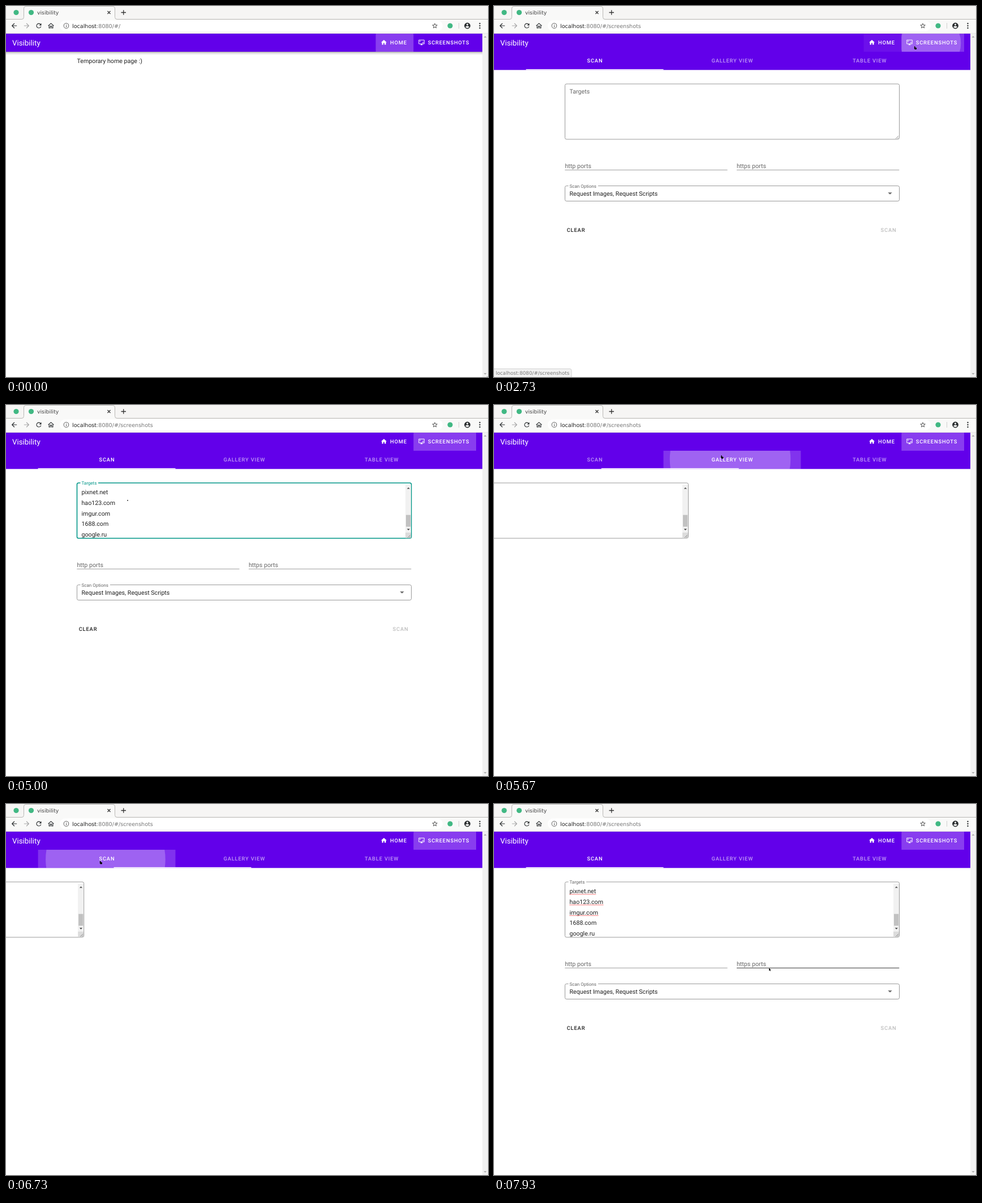
Recreate the animation shown at these times as an HTML page. Size 852 px wide and 657 px high, loop 8000 ms.

```html
<!DOCTYPE html>
<html lang="en">
<head>
<meta charset="utf-8">
<title>Visibility</title>
<style>
html, body { margin: 0; width: 100%; height: 100%; overflow: hidden; background: #fff; }
svg { display: block; width: 852px; height: 657px; font: 10.67px Roboto, sans-serif; text-rendering: geometricPrecision; }
text { white-space: pre; fill: #212121; }
.ui { font-family: "DejaVu Sans", sans-serif; }
.btn { font-size: 9.33px; font-weight: 500; letter-spacing: .0893em; }
.white { fill: #fff; }
.small { font-size: 8px; }
.muted { fill: #666; }
.box { fill: none; stroke: #9a9a9a; }
</style>
</head>
<body>
<svg id="stage" viewBox="0 0 852 657"></svg>
<script>
const LOOP = 8000, PAGE_W = 842, TAB_X = 56.6, TAB_W = 242.9;
const PURPLE = '#6200ea';
const $ = id => document.getElementById(id);

const icons = {
  back: 'M20 11H7.83l5.59-5.59L12 4l-8 8 8 8 1.41-1.41L7.83 13H20z',
  forward: 'M12 4l-1.41 1.41L16.17 11H4v2h12.17l-5.58 5.59L12 20l8-8z',
  reload: 'M17.65 6.35A8 8 0 1 0 19.73 14h-2.08A6 6 0 1 1 16.22 7.78L13 11h7V4z',
  homeLine: 'M12 5.69l5 4.5V18h-2v-6H9v6H7v-7.81zM12 3L2 12h3v8h6v-6h2v6h6v-8h3z',
  home: 'M10 20v-6h4v6h5v-8h3L12 3 2 12h3v8z',
  info: 'M11 7h2v2h-2zm0 4h2v6h-2zM12 2a10 10 0 1 0 0 20 10 10 0 0 0 0-20zm0 18.2a8.2 8.2 0 1 1 0-16.4 8.2 8.2 0 0 1 0 16.4z',
  star: 'M22 9.24l-7.19-.62L12 2 9.19 8.63 2 9.24l5.46 4.73L5.82 21 12 17.27 18.18 21l-1.63-7.03zM12 15.4l-3.76 2.27 1-4.28-3.32-2.88 4.38-.38L12 6.1l1.71 4.04 4.38.38-3.32 2.88 1 4.28z',
  person: 'M12 2a10 10 0 1 0 0 20 10 10 0 0 0 0-20zm0 3a3 3 0 1 1 0 6 3 3 0 0 1 0-6zm0 14.2c-2.5 0-4.71-1.28-6-3.22.03-1.99 4-3.08 6-3.08s5.97 1.09 6 3.08a7.2 7.2 0 0 1-6 3.22z',
  monitor: 'M9 6H5v4h2V8h2zm10 4h-2v2h-2v2h4zm2 6H3V4h18zm0-14H3a2 2 0 0 0-2 2v12a2 2 0 0 0 2 2h7v2H8v2h8v-2h-2v-2h7a2 2 0 0 0 2-2V4a2 2 0 0 0-2-2z'
};
const icon = (name, cx, cy, size, fill = '#2b2e30') =>
  `<path d="${icons[name]}" fill="${fill}" fill-rule="evenodd" transform="translate(${cx - size / 2} ${cy - size / 2}) scale(${size / 24})"/>`;
const rect = (x, y, w, h, fill, extra = '') =>
  `<rect x="${x}" y="${y}" width="${w}" height="${h}" fill="${fill}" ${extra}/>`;
const text = (x, y, str, cls = '', extra = '') =>
  `<text x="${x}" y="${y}" class="${cls}" ${extra}>${str}</text>`;
const line = (x1, y, x2, id = '') =>
  `<path ${id && `id="${id}"`} d="M${x1} ${y}H${x2}" stroke="#949494" stroke-width=".9"/>`;
const triangle = (cx, cy, w, dir, fill) =>
  `<path d="M${cx - w} ${cy - dir * w / 2}h${2 * w}l${-w} ${dir * w}z" fill="${fill}"/>`;
const badge = (x, y) => `<circle cx="${x}" cy="${y}" r="4.6" fill="#41b883"/>`;

// Rounded outline with a notch in its top edge.
const outline = (x, y, w, h, gapEnd) => {
  const r = 2.7, a = x + 6;
  return `M${Math.max(a, gapEnd)} ${y}H${x + w - r}q${r} 0 ${r} ${r}V${y + h - r}q0 ${r} ${-r} ${r}` +
    `H${x + r}q${-r} 0 ${-r} ${-r}V${y + r}q0 ${-r} ${r} ${-r}H${a}`;
};

const tabNames = ['SCAN', 'GALLERY VIEW', 'TABLE VIEW'];
const tabX = i => TAB_X + i * TAB_W;
const hosts = [['pixnet.net', 47], ['hao123.com', 60], ['imgur.com', 51], ['1688.com', 0], ['google.ru', 0]];

const tabEdge = 'M0 23.5H28q3.5 0 3.5-4V5q0-4.5 4.5-4.5H188q4.5 0 4.5 4.5V19.5q0 4 3.5 4H852';
const browser = () =>
  rect(0, 0, 852, 48.6, '#f6f5f4') +
  `<path d="${tabEdge}V48.6H0z" fill="#f9f9f8"/><path d="${tabEdge}" fill="none" stroke="#b9b8b5"/>` +
  badge(18, 11.5) + badge(44.5, 11.5) +
  text(55, 15, 'visibility', 'ui', 'style="font-size:9.3px;fill:#444"') +
  '<path d="M179.5 9l5 5m0-5l-5 5M203.500 11.5h8.5m-4.250-4.250v8.5" stroke="#333" stroke-width="1.3"/>' +
  rect(95, 25.5, 677, 19, '#fff', 'rx="9.5"') +
  icon('back', 14.5, 35, 14) + icon('forward', 36.5, 35, 14, '#a5a5a5') +
  icon('reload', 58, 35, 13.5) + icon('homeLine', 79.5, 35, 13.5) +
  icon('info', 106.5, 35, 11.5, '#444') + icon('star', 758, 35, 12, '#444') +
  badge(785, 35) + rect(800, 30, 1, 10, '#d0d0d0') + icon('person', 815.5, 35, 13) +
  [31, 35, 39].map(y => `<circle cx="837.5" cy="${y}" r="1.2" fill="#2b2e30"/>`).join('') +
  text(117, 38.5, 'localhost<tspan fill="#777">:8080/#/<tspan id="route"></tspan></tspan>', 'ui', 'style="font-size:9.6px"') +
  rect(0, 47.9, 852, .7, '#d8d7d4') +
  rect(842, 48.6, 10, 609, '#f1f1f1') +
  triangle(847, 54.5, 2.6, -1, '#a3a3a3') + triangle(847, 651.5, 2.6, 1, '#a3a3a3');

const appBar = () =>
  rect(0, 48.6, PAGE_W, 32.4, PURPLE) +
  text(11, 69.5, 'Visibility', 'white', 'style="font-size:13.33px"') +
  rect(653.5, 48.6, 66.8, 32.4, '#fff', 'id="homeOn"') + rect(720.3, 48.6, 110.7, 32.4, '#fff', 'id="shotsOn"') +
  '<circle id="btnRipple" fill="#fff" clip-path="url(#btnClip)"/>' +
  icon('home', 668, 64.5, 12, '#fff') + text(679, 68, 'HOME', 'btn white') +
  icon('monitor', 734.5, 64.5, 11.5, '#fff') + text(745.7, 68, 'SCREENSHOTS', 'btn white');

const tabBar = () =>
  rect(0, 80.5, PAGE_W, 32.8, PURPLE) +
  tabNames.map((name, i) =>
    rect(tabX(i), 81, TAB_W, 32.3, '#fff', `id="tabHover${i}" opacity="0"`)).join('') +
  '<circle id="ripple0" fill="#fff" clip-path="url(#tabClip0)"/><circle id="ripple1" fill="#fff" clip-path="url(#tabClip1)"/>' +
  tabNames.map((name, i) =>
    text(tabX(i) + TAB_W / 2 + .4, 100.4, name, 'btn white', `id="tab${i}" text-anchor="middle"`)).join('') +
  rect(0, 111.9, TAB_W, 1.4, '#fff', 'id="slider"');

const targets = () =>
  '<g id="targets"><path id="targetBox" class="box"/>' +
  '<g id="pasted" clip-path="url(#areaClip)">' +
  hosts.map(([name, w], i) => {
    const y = 158 + i * 18.8;
    return text(133.5, y, name) +
      (w ? `<path class="spell" d="M133.5 ${y + 2}h${w}" stroke="#f33" stroke-width=".9" stroke-dasharray="1.3 .5"/>` : '');
  }).join('') +
  rect(706, 141, 10, 85, '#f1f1f1') + rect(707, 194.7, 8.2, 20.8, '#c1c1c1') +
  triangle(711.3, 147.2, 2.6, -1, '#444') + triangle(711.3, 220.6, 2.6, 1, '#444') +
  rect(706, 226, 10, 10, '#dcdcdc') + '</g>' +
  '<path d="M710 235l5-5m-2 5l2-2" stroke="#777" stroke-width=".8"/>' +
  '<path id="caret" d="M134 146.5v10" stroke="#222" stroke-width=".8"/>' +
  text(133.5, 0, 'Targets', 'muted', 'id="targetLabel"') + '</g>';

const restOfForm = () =>
  '<g id="rest">' +
  text(125.5, 286.6, 'http ports', 'muted') + text(429, 286.6, 'https ports', 'muted') +
  line(125.3, 290.4, 412.6) + line(429, 290.4, 716.3, 'httpsLine') +
  `<path class="box" d="${outline(125.5, 318.5, 591, 27, 184)}"/>` +
  text(133.5, 321.8, 'Scan Options', 'small muted') +
  text(133.5, 336, 'Request Images, Request Scripts') +
  triangle(700, 332, 3.7, 1, '#666') +
  text(128.7, 400, 'CLEAR', 'btn') + text(683.6, 400, 'SCAN', 'btn', 'style="fill:#bdbdbd"') +
  '</g>';

const clip = (id, x, y, w, h) => `<clipPath id="${id}">${rect(x, y, w, h, '#000')}</clipPath>`;

$('stage').innerHTML =
  `<defs>${clip('areaClip', 126, 140, 590, 95.4)}${clip('btnClip', 720.3, 48.6, 110.7, 32.4)}` +
  `${clip('tabClip0', tabX(0), 81, TAB_W, 32.3)}${clip('tabClip1', tabX(1), 81, TAB_W, 32.3)}` +
  '<linearGradient id="shade" x2="0" y2="1"><stop stop-opacity=".34"/><stop offset=".4" stop-opacity=".12"/><stop offset="1" stop-opacity="0"/></linearGradient></defs>' +
  rect(0, 0, 852, 657, '#fff') +
  `<g id="homePage">${rect(0, 81, PAGE_W, 6, 'url(#shade)')}${text(125.5, 100.6, 'Temporary home page :)')}</g>` +
  `<g id="shotsPage">${targets()}${restOfForm()}${tabBar()}</g>` +
  appBar() + browser() +
  '<g id="status"><path id="statusBox" fill="#f2f2f2" stroke="#d2d2d2"/>' +
  text(3, 652.8, '', 'ui', 'id="statusText" style="font-size:8.75px;fill:#777"') + '</g>' +
  '<path id="cursor" stroke="#fff" stroke-opacity=".4" stroke-width=".4" paint-order="stroke"/>';

const clamp = v => Math.min(1, Math.max(0, v));
const mix = (a, b, p) => a + (b - a) * p;

function bezier(x1, y1, x2, y2) {
  const curve = (a, b, s) => 3 * (1 - s) ** 2 * s * a + 3 * (1 - s) * s * s * b + s ** 3;
  return x => {
    let lo = 0, hi = 1;
    for (let i = 0; i < 24; i++) {
      const mid = (lo + hi) / 2;
      if (curve(x1, x2, mid) < x) lo = mid; else hi = mid;
    }
    return x <= 0 ? 0 : x >= 1 ? 1 : curve(y1, y2, lo);
  };
}
const swing = bezier(.25, .8, .5, 1), standard = bezier(.4, 0, .2, 1);
const run = (t, start, ease = swing, length = 300) => ease(clamp((t - start) / length));

// Event times in ms
const OPEN = 2600, FOCUS = 3830, PASTE = 4400;
const TO_GALLERY = 5560, SLIDE_OUT = 5621, TO_SCAN = 6632, SLIDE_IN = 6698;

const path = [
  [0, 850, 656], [100, 850, 656], [530, 434, 358], [720, 434, 358], [800, 427, 343], [960, 427, 343],
  [1500, 802, 66], [1730, 743.5, 71], [2750, 743.5, 71], [3270, 329, 160], [3400, 239, 166],
  [3530, 215, 169], [5000, 215, 169], [5440, 402, 89], [6110, 402, 89], [6500, 166.5, 100.5],
  [6980, 166.5, 100.5], [7470, 330, 190], [7930, 486, 290.5], [8000, 486, 290.5]
];
function cursorAt(t) {
  const i = Math.max(1, path.findIndex(k => k[0] > t));
  const [a, b] = [path[i - 1], path[i]];
  const p = clamp((t - a[0]) / (b[0] - a[0])), e = p * p * (3 - 2 * p);
  return [mix(a[1], b[1], e), mix(a[2], b[2], e)];
}

const set = (id, attrs) => { for (const k in attrs) $(id).setAttribute(k, attrs[k]); };
const show = (id, on) => set(id, { visibility: on ? 'inherit' : 'hidden' });

function ripple(id, t, start, from, to, radius) {
  const p = run(t, start, swing, 250);
  set(id, {
    cx: mix(from[0], to[0], p), cy: mix(from[1], to[1], p), r: radius * mix(.3, 1, p),
    opacity: t < start ? 0 : .235 * (1 - run(t, start + 250))
  });
}

function render(t) {
  const [x, y] = cursorAt(t);
  const inside = (l, top, r, b) => x >= l && x < r && y >= top && y < b;
  const onShots = t >= OPEN + 65;
  const overArea = onShots && inside(125, 138, 717, 236);

  show('homePage', !onShots);
  show('shotsPage', onShots);
  $('route').textContent = onShots ? 'screenshots' : '';
  const active = run(t, OPEN + 60, swing, 200);
  set('homeOn', { opacity: .24 * (1 - active) });
  set('shotsOn', { opacity: mix(.08 * run(t, 1840, swing, 200), .24, active) });
  ripple('btnRipple', t, OPEN, [743.5, 71], [775.6, 65], 57.6);

  // Tabs
  const gallery = run(t, TO_GALLERY, standard) - run(t, TO_SCAN, standard);
  set('slider', { x: tabX(gallery) });
  const selected = t >= TO_GALLERY && t < TO_SCAN ? 1 : 0;
  tabNames.forEach((_, i) => set('tab' + i, { 'fill-opacity': i === selected ? 1 : .6 }));
  const hover = (enter, press, leave) =>
    (.08 * run(t, enter) + .13 * run(t, press, swing, 200)) * (1 - run(t, leave));
  set('tabHover1', { opacity: hover(5340, TO_GALLERY, 6290) });
  set('tabHover0', { opacity: hover(6290, TO_SCAN, 7130) });
  ripple('ripple1', t, TO_GALLERY + 5, [402, 92], [tabX(1) + TAB_W / 2, 97], 122.5);
  ripple('ripple0', t, TO_SCAN - 4, [167, 103], [tabX(0) + TAB_W / 2, 97], 122.5);

  // Form
  const away = run(t, SLIDE_OUT) - run(t, SLIDE_IN);
  const settled = t >= SLIDE_IN + 300;
  set('targets', { transform: `translate(${-PAGE_W * away} 0)` });
  show('rest', t < SLIDE_OUT || settled);
  const focused = t >= FOCUS && t < TO_GALLERY;
  const lift = run(t, FOCUS);
  set('targetBox', {
    d: outline(125.5, 138, 591, 98, 131.5 + 31.5 * lift),
    style: `stroke:${focused ? '#009688' : overArea ? '#555' : '#9a9a9a'};stroke-width:${focused ? 1.6 : 1}`
  });
  set('targetLabel', {
    y: mix(154.6, 141, lift),
    style: `font-size:${mix(10.67, 8, lift)}px;fill:${focused ? '#009688' : '#666'}`
  });
  show('caret', t >= FOCUS && t < PASTE);
  show('pasted', t >= PASTE);
  document.querySelectorAll('.spell').forEach(s =>
    s.setAttribute('visibility', settled ? 'inherit' : 'hidden'));
  set('httpsLine', { stroke: onShots && inside(429, 268, 717, 298) ? '#222' : '#949494' });

  // Link preview in the corner
  const overHome = t >= 2930;
  const width = overHome ? 84.5 : 137;
  show('status', t >= 1870 && t < 3500);
  set('status', { opacity: run(t, 1850, swing, 150) });
  set('statusBox', { d: `M-1 642.5H${width - 3}q3 0 3 3V658H-1z` });
  $('statusText').textContent = 'localhost:8080/#/' + (overHome ? '' : 'screenshots');

  const overLink = inside(653, 49, 831, 81) || (onShots && inside(TAB_X, 81, 785, 113));
  const shape = overArea ? 'M-.8 -.8h1.6v1.6h-1.6z'
    : overLink ? 'M-.6 .2h1.5v2l2.6 .7v2l-.6 1h-2.4l-1.5-2 .3-.6z'
    : 'M0 0v4.8l1.2-1 .8 1.7 1-.5-.8-1.6h1.5z';
  set('cursor', { d: shape, transform: `translate(${x} ${y})` });
}

const origin = performance.now();
function tick() {
  render((performance.now() - origin) % LOOP);
  requestAnimationFrame(tick);
}
tick();
</script>
</body>
</html>
```
